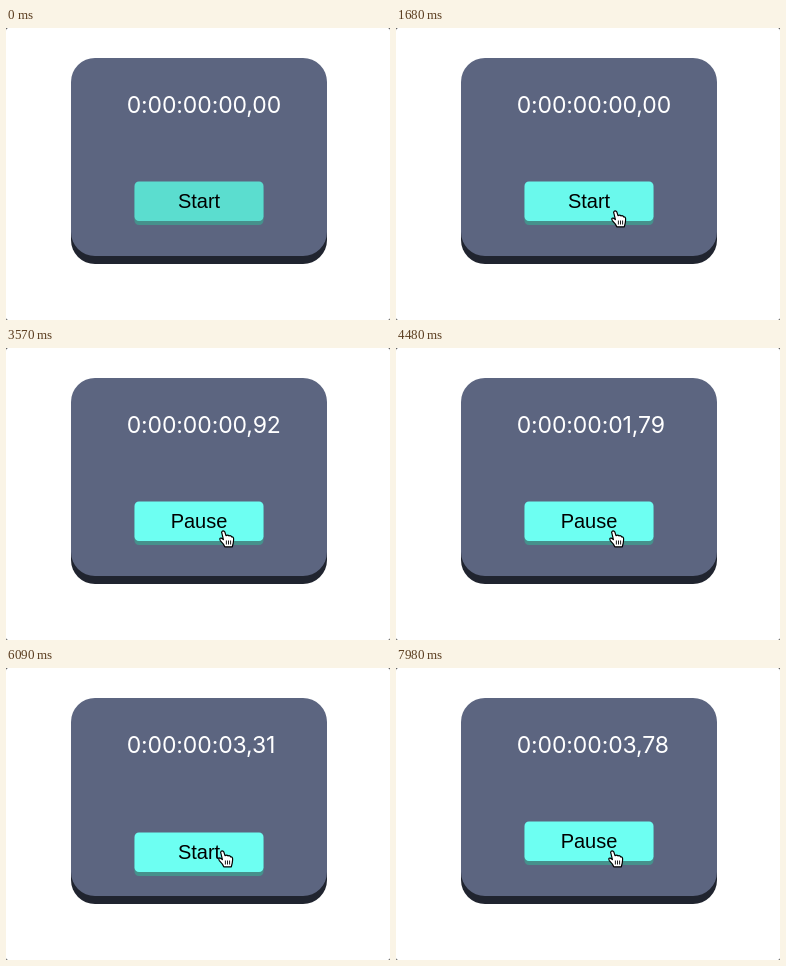
These frames come from a looping animation (384x292 px, 8000 ms). An HTML page:

```html
<!DOCTYPE html>
<html lang="en">
<head>
<meta charset="utf-8">
<title>Stopwatch</title>
<style>
  html, body { margin: 0; width: 100%; height: 100%; overflow: hidden; background: #444; }
  svg { display: block; width: 384px; height: 292px; }
  #clock { font: 23px Inter, sans-serif; letter-spacing: -.12px; fill: #fff; }
  #label { font: 20px "Liberation Sans", Arial, sans-serif; text-anchor: middle; }
</style>
</head>
<body>
<svg viewBox="0 0 384 292">
  <rect width="384" height="292" rx="2.5" fill="#fff"/>
  <rect x="65" y="38" width="256" height="198" rx="24" fill="#20242f"/>
  <rect x="65" y="30" width="256" height="198" rx="24" fill="#5c6580"/>
  <text id="clock" x="120.7" y="85"></text>
  <g id="button">
    <rect x="128.5" y="157.5" width="129" height="39.500" rx="4.500" fill="#46918c"/>
    <rect id="face" x="128.5" y="153.5" width="129" height="39.500" rx="4.500"/>
    <text id="label" x="193" y="180"></text>
  </g>
  <g id="hand" stroke="#000" stroke-width="1.200" stroke-linejoin="round">
    <path fill="#fff" d="M2.600 2.200Q3.800 -.4 5.800 1.900L7 5.600Q9 4.600 10 5.900Q12 5.200 12.700 7Q14.900 6.600 14.600 10Q14.500 13 13.300 16.800L5.800 16.800Q4.800 14 1.300 10.600Q-.2 7.600 2.500 8.200L4.400 9.600Z"/>
    <path fill="none" stroke-width=".9" d="M7.400 10.500v4M9.500 10.500v4M11.600 10.500v4"/>
  </g>
</svg>
<script>
  const LOOP = 8000, STEP = 70;
  const HOVER = 1470, HOVER_TIME = 420;
  const PRESSES = [2380, 5880, 7280], PRESS_TIME = 280, PRESS_DEPTH = 16;
  const START = 2618, PAUSE = 6076, RESUME = 7488;
  // [time in ms, hundredths of a second on the clock]
  const COUNT = [[START, 0], [2660, 4], [4480, 179], [5530, 279], [PAUSE, 331], [RESUME, 331], [7980, 378]];

  const el = id => document.getElementById(id);
  const [clock, button, face, label, hand] = ["clock", "button", "face", "label", "hand"].map(el);
  const clamp = x => Math.min(1, Math.max(0, x));
  const mix = (a, b, p) => a + (b - a) * p;
  const pad = n => String(n).padStart(2, "0");

  function hundredths(t) {
    if (t <= START) return 0;
    const i = COUNT.findIndex(([time]) => time >= t);
    const [t0, n0] = COUNT[i - 1], [t1, n1] = COUNT[i];
    return Math.round(mix(n0, n1, (t - t0) / (t1 - t0)));
  }

  function draw(t) {
    const n = hundredths(t);
    clock.textContent = `0:00:00:${pad(Math.floor(n / 100))},${pad(n % 100)}`;

    const running = t >= START && t < PAUSE || t >= RESUME;
    label.textContent = running ? "Pause" : "Start";

    const glow = 1 - (1 - clamp((t - HOVER) / HOVER_TIME)) ** 2.5;
    face.setAttribute("fill", `rgb(${mix(91, 109, glow)},${mix(221, 255, glow)},${mix(207, 242, glow)})`);

    const press = PRESSES.reduce((sum, p) => sum + Math.sin(Math.PI * clamp((t - p) / PRESS_TIME)), 0);
    button.setAttribute("transform", `translate(0 ${Math.round(PRESS_DEPTH * press)})`);

    const x = t < 1750 ? 215 : t < 4550 ? 213 : 212;
    hand.setAttribute("transform", `translate(${x} 182)`);
    hand.setAttribute("visibility", t < HOVER ? "hidden" : "visible");
  }

  function tick() {
    const t = performance.now() % LOOP;
    draw(Math.floor(t / STEP) * STEP);
    requestAnimationFrame(tick);
  }
  tick();
</script>
</body>
</html>
```
